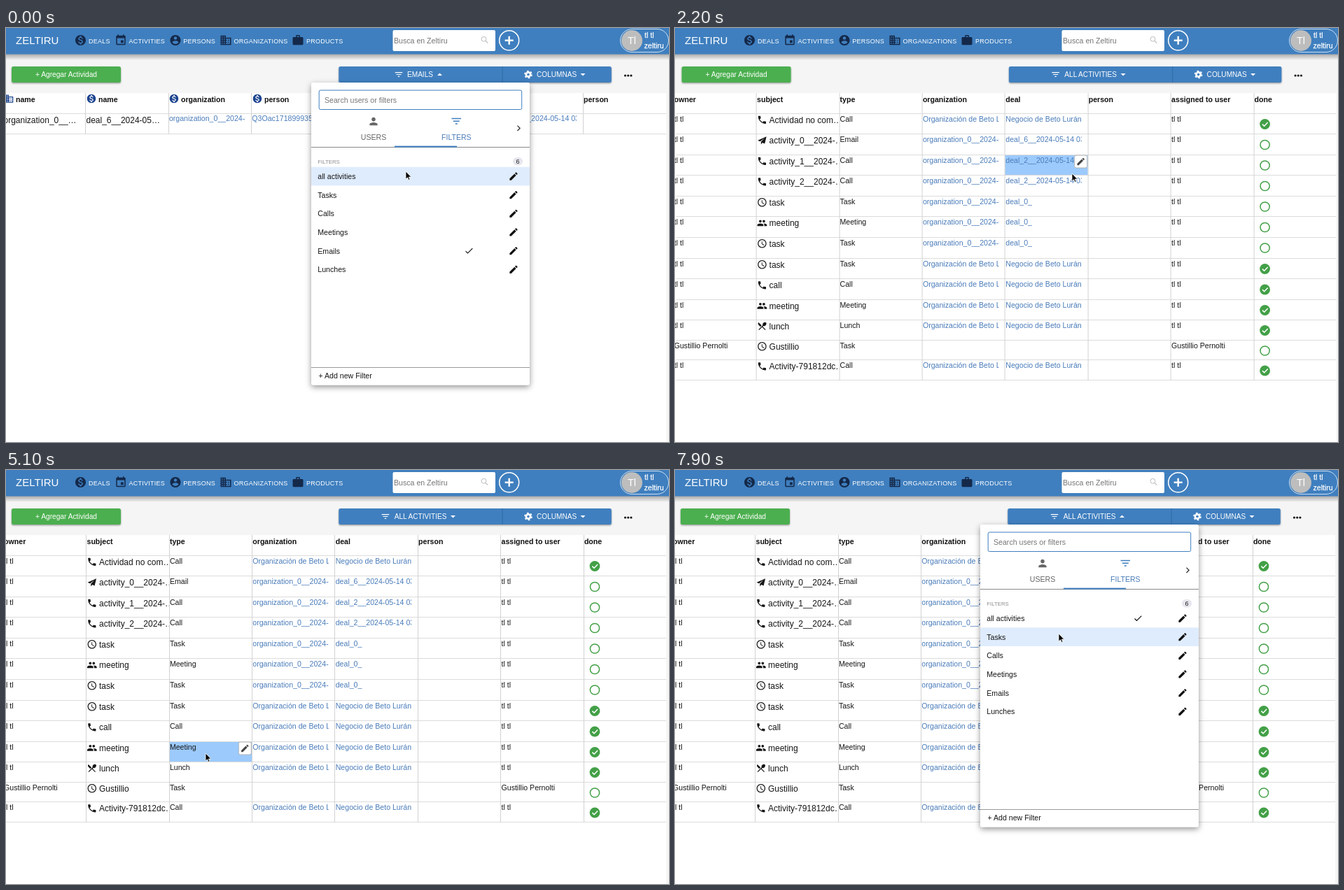
Animation of 947x592 px, one loop 8000 ms. Source, as an HTML page:

```html
<!DOCTYPE html>
<html lang="es">
<head>
<meta charset="utf-8">
<title>Activities</title>
<style>
html, body { margin: 0; width: 100%; height: 100%; overflow: hidden; background: #fff; }
#stage { display: block; width: 947px; height: 592px; font-family: "Liberation Sans", Arial, sans-serif; }
text { white-space: pre; }
</style>
</head>
<body>
<svg id="stage" viewBox="0 0 947 592"></svg>
<script>
const LOOP = 8000, STEP = 100;
const BLUE = '#3f7fbf', LINK = '#4a7cba', NAVY = '#14294a', INK = '#161616';
const COL_W = 118.4, ROWS = [122, 151.5, 181, 210.5, 240, 269.5, 299, 329, 358.5, 388, 417, 446, 474.5, 503.5];
const colX = i => -3.9 + COL_W * i;

const DISC = 'M12 2C6.48 2 2 6.48 2 12s4.48 10 10 10 10-4.48 10-10S17.52 2 12 2z';
const ICONS = {
  money: DISC + 'm1.41 16.09V20h-2.67v-1.93c-1.71-.36-3.16-1.46-3.27-3.4h1.96c.1 1.05.82 1.87 2.65 1.87 1.96 0 2.4-.98 2.4-1.59 0-.83-.44-1.61-2.67-2.14-2.48-.6-4.18-1.62-4.18-3.67 0-1.72 1.39-2.84 3.11-3.21V4h2.67v1.95c1.86.45 2.79 1.86 2.85 3.39H14.3c-.05-1.11-.64-1.87-2.22-1.87-1.5 0-2.4.68-2.4 1.64 0 .84.65 1.39 2.67 1.91s4.18 1.39 4.18 3.91c-.01 1.83-1.38 2.83-3.12 3.16z',
  event: 'M17 12h-5v5h5zM16 1v2H8V1H6v2H5c-1.1 0-2 .9-2 2v14c0 1.1.9 2 2 2h14c1.1 0 2-.9 2-2V5c0-1.1-.9-2-2-2h-1V1zm3 18H5V8h14z',
  account: DISC + 'm0 3c1.66 0 3 1.34 3 3s-1.34 3-3 3-3-1.34-3-3 1.34-3 3-3zm0 14.2c-2.5 0-4.71-1.28-6-3.22.03-1.99 4-3.08 6-3.08 1.99 0 5.97 1.09 6 3.08-1.29 1.94-3.5 3.22-6 3.22z',
  business: 'M12 7V3H2v18h20V7zM6 19H4v-2h2zm0-4H4v-2h2zm0-4H4V9h2zm0-4H4V5h2zm4 12H8v-2h2zm0-4H8v-2h2zm0-4H8V9h2zm0-4H8V5h2zm10 12h-8v-2h2v-2h-2v-2h2v-2h-2V9h8zm-2-8h-2v2h2zm0 4h-2v2h2z',
  work: 'M20 6h-4V4c0-1.1-.9-2-2-2h-4c-1.1 0-2 .9-2 2v2H4c-1.1 0-2 .9-2 2v11c0 1.1.9 2 2 2h16c1.1 0 2-.9 2-2V8c0-1.1-.9-2-2-2zm-6 0h-4V4h4z',
  call: 'M6.62 10.79c1.44 2.83 3.76 5.14 6.59 6.59l2.2-2.2c.27-.27.67-.36 1.02-.24 1.12.37 2.33.57 3.57.57.55 0 1 .45 1 1V20c0 .55-.45 1-1 1-9.39 0-17-7.61-17-17 0-.55.45-1 1-1h3.5c.55 0 1 .45 1 1 0 1.25.2 2.45.57 3.57.11.35.03.74-.25 1.02z',
  meeting: 'M16 11c1.66 0 3-1.34 3-3s-1.34-3-3-3-3 1.34-3 3 1.34 3 3 3zm-8 0c1.66 0 3-1.34 3-3S9.66 5 8 5 5 6.34 5 8s1.34 3 3 3zm0 2c-2.33 0-7 1.17-7 3.5V19h14v-2.5c0-2.33-4.67-3.5-7-3.5zm8 0l-1 .05c1.16.84 2 1.97 2 3.45V19h6v-2.5c0-2.33-4.67-3.5-7-3.5z',
  task: DISC + 'm0 18c-4.42 0-8-3.58-8-8s3.58-8 8-8 8 3.58 8 8-3.58 8-8 8zm.5-13H11v6l5.25 3.15.75-1.23-4.5-2.67z',
  lunch: 'M8.1 13.34l2.83-2.83L3.91 3.5c-1.56 1.56-1.56 4.09 0 5.66zm6.78-1.81c1.53.71 3.68.21 5.27-1.38 1.91-1.91 2.28-4.65.81-6.12-1.46-1.46-4.2-1.1-6.12.81-1.59 1.59-2.09 3.74-1.38 5.27L3.7 19.87l1.41 1.41L12 14.41l6.88 6.88 1.41-1.41L13.41 13z',
  email: 'M22 3L2 12l5.5 2.2L18 6.5 9.5 15v6l3.2-4 5.3 2.5z',
  edit: 'M3 17.25V21h3.75L17.81 9.94l-3.75-3.75zM20.71 7.04c.39-.39.39-1.02 0-1.41l-2.34-2.34c-.39-.39-1.02-.39-1.41 0l-1.83 1.83 3.75 3.75z',
  person: 'M12 12c2.21 0 4-1.79 4-4s-1.79-4-4-4-4 1.79-4 4 1.79 4 4 4zm0 2c-2.67 0-8 1.34-8 4v2h16v-2c0-2.66-5.33-4-8-4z',
  filter: 'M10 18h4v-2h-4zM3 6v2h18V6zm3 7h12v-2H6z',
  check: 'M9 16.17L4.83 12l-1.42 1.41L9 19 21 7l-1.41-1.41z',
  down: 'M6 9.5h12l-6 6z',
  up: 'M6 14.5h12l-6-6z'
};

const text = (x, y, s, size = 10.6, fill = INK, extra = '') =>
  `<text x="${x}" y="${y}" font-size="${size}" fill="${fill}" ${extra}>${s}</text>`;
const bold = (x, y, s) => text(x, y, s, 10.6, '#111', 'font-weight="bold"');
const rect = (x, y, w, h, fill, extra = '') =>
  `<rect x="${x}" y="${y}" width="${w}" height="${h}" fill="${fill}" ${extra}/>`;
const circle = (x, y, r, fill, extra = '') => `<circle cx="${x}" cy="${y}" r="${r}" fill="${fill}" ${extra}/>`;
const path = (d, stroke, w) => `<path d="${d}" fill="none" stroke="${stroke}" stroke-width="${w}"/>`;
const icon = (name, x, y, size, fill = INK) =>
  `<path transform="translate(${x - size / 2} ${y - size / 2}) scale(${size / 24})" d="${ICONS[name]}" fill="${fill}"/>`;
const clip = (x, y, w, inner) => `<svg x="${x}" y="${y}" width="${w}" height="29">${inner}</svg>`;
const group = (id, inner, extra = '') => `<g id="${id}" ${extra}>${inner}</g>`;
const CENTER = 'text-anchor="middle"';

function nav() {
  const links = [['money', 106.5, 118, 'DEALS'], ['event', 164, 175.5, 'ACTIVITIES'], ['account', 242, 253.2, 'PERSONS'],
    ['business', 314, 325.5, 'ORGANIZATIONS'], ['work', 417, 429, 'PRODUCTS']];
  return rect(0, 37, 947, 9, 'url(#navShadow)') + rect(0, 0, 947, 37.5, BLUE) +
    text(14, 23, 'ZELTIRU', 15, '#fff') +
    links.map(([name, ix, tx, label]) =>
      icon(name, ix, 17.5, 18, NAVY) + text(tx, 21.8, label, 9, '#fff', 'letter-spacing=".25"')).join('') +
    rect(552.5, 3, 146.5, 30, '#fff', 'rx="2"') + text(554, 21.7, 'Busca en Zeltiru', 10.6, '#757575') +
    circle(682.5, 15.8, 3.4, 'none', 'stroke="#bbb"') + path('M685 18.3l3.4 3.4', '#bbb', 1.2) +
    circle(718.7, 17.8, 14, 'none', 'stroke="#fff" stroke-width="1.5"') + path('M712.7 17.8h12M718.7 11.8v12', '#fff', 2.4) +
    rect(877.5, 1.5, 69, 33, 'none', 'rx="16.5" stroke="#cfe0f0"') + circle(894, 18, 15, '#bdbdbd') +
    text(894, 23, 'Tl', 14.5, '#fff', CENTER) +
    text(912, 14, 'tl tl', 10.6, '#fff', 'stroke="#fff" stroke-width=".25"') + text(911.5, 29, 'zeltiru', 10.6, '#fff', 'stroke="#fff" stroke-width=".25"');
}

function toolbar() {
  const label = (id, s, ix, tx, ax) => group(id, icon('filter', ix, 66.5, 14, '#fff') + text(tx, 70, s, 10.1, '#fff') +
    group(id + 'Down', icon('down', ax, 66.5, 14, '#fff')) + group(id + 'Up', icon('up', ax, 66.5, 14, '#fff')));
  return rect(8, 55, 156, 23, '#4caf50', 'rx="2.5" filter="url(#lift)"') +
    text(86, 69.7, '+ Agregar Actividad', 10.2, '#fff', CENTER) +
    rect(475.3, 55, 389.5, 23, BLUE, 'rx="2.5" filter="url(#lift)"') + rect(708.6, 55, 1, 23, '#2f6aa6') +
    label('emails', 'EMAILS', 561, 573, 619.5) + label('all', 'ALL ACTIVITIES', 542, 554.7, 638.5) +
    circle(746, 66.5, 3.1, 'none', 'stroke="#fff" stroke-width="2.6"') +
    circle(746, 66.5, 5, 'none', 'stroke="#fff" stroke-width="1.7" stroke-dasharray="2.6 2.636"') +
    text(758, 70, 'COLUMNAS', 10.1, '#fff') + icon('down', 824, 66.5, 14, '#fff') +
    [884.5, 888.7, 892.9].map(x => circle(x, 68, 1.6, '#111')).join('');
}

function grid(rowCount, dx = 0) {
  const bottom = ROWS[rowCount];
  let d = '';
  for (let i = 0; i <= rowCount; i++) d += `M0 ${Math.floor(ROWS[i]) + .5}H943`;
  let v = '';
  for (let i = 1; i < 8; i++) v += `M${Math.round(colX(i) + dx - .3) + .5} 93V${bottom}`;
  return path(d, '#dcdcdc', 1) + path(v, '#d2d2d2', 1);
}

function emailTable() {
  const heads = [['business', 4, 'name'], ['money', 122, 'name'], ['money', 240, 'organization'], ['money', 359, 'person']];
  const links = [[2, 'organization_0__2024-05'], [3, 'Q3Oac17189993511'], [6, 'deal_6__2024-05-14 03:']];
  return grid(1, -1) +
    heads.map(([name, x, s]) => icon(name, x, 101, 15, '#1b438f') + bold(x + 10, 106, s)).join('') + bold(825, 106, 'person') +
    text(-3.5, 135.5, 'organization_0__…', 12) + text(114.5, 135.5, 'deal_6__2024-05…', 12) +
    links.map(([c, s]) => clip(colX(c), 122, 108.5, text(0, 11.3, s, 10.6, LINK))).join('');
}

const ORG = 'Organización de Beto Lurán', DEAL = 'Negocio de Beto Lurán', ORG0 = 'organization_0__2024-05', USER = 'tl tl';
const LONG_NAME = 'Gustillio Pernolti';
// [subject, type, organization, deal, done, user]
const DATA = [
  ['Actividad no com…', 'Call', ORG, DEAL, 1],
  ['activity_0__2024-…', 'Email', ORG0, 'deal_6__2024-05-14 03:', 0],
  ['activity_1__2024-…', 'Call', ORG0, 'deal_2__2024-05-14 03:', 0],
  ['activity_2__2024-…', 'Call', ORG0, 'deal_2__2024-05-14 03:', 0],
  ['task', 'Task', ORG0, 'deal_0_', 0],
  ['meeting', 'Meeting', ORG0, 'deal_0_', 0],
  ['task', 'Task', ORG0, 'deal_0_', 0],
  ['task', 'Task', ORG, DEAL, 1],
  ['call', 'Call', ORG, DEAL, 1],
  ['meeting', 'Meeting', ORG, DEAL, 1],
  ['lunch', 'Lunch', ORG, DEAL, 1],
  ['Gustillio', 'Task', '', '', 0, LONG_NAME],
  ['Activity-791812dc…', 'Call', ORG, DEAL, 1]
];
const HEADS = ['owner', 'subject', 'type', 'organization', 'deal', 'person', 'assigned to user', 'done'];

function dataRow([subject, type, org, deal, done, user = USER], i) {
  const y = ROWS[i];
  const plain = (c, s, fill) => clip(colX(c) + 1, y, 108.5, text(0, 11.5, s, 10.6, fill));
  const mark = done
    ? circle(841, y + 15.5, 7.4, '#43a047') + path(`M837.4 ${y + 15.6}l2.7 2.7 5-5.2`, '#fff', 1.5)
    : circle(841, y + 15.5, 6.6, 'none', 'stroke="#43a047" stroke-width="1.5"');
  return group('row' + i, plain(0, user) + icon(type.toLowerCase(), 122.8, y + 9.3, 15) +
    clip(133, y, 99.5, text(0, 13.5, subject, 12, INK, `id="subject${i}"`)) +
    plain(2, type) + plain(3, org, LINK) + plain(4, deal, LINK) + plain(6, user) + mark);
}

const ITEMS = ['all activities', 'Tasks', 'Calls', 'Meetings', 'Emails', 'Lunches'];
const ITEM_TOP = 198.7, ITEM_H = 26.65;

function menu() {
  const itemY = i => ITEM_TOP + ITEM_H * (i + .5);
  return rect(436, 78, 312, 432.5, '#fff', 'rx="3" filter="url(#float)"') +
    rect(447.2, 89, 289.5, 27.5, '#fff', `rx="2" stroke="${BLUE}"`) +
    text(455, 106.7, 'Search users or filters', 10.6, '#777') +
    icon('person', 525, 133.5, 17, '#666') + text(525, 159.7, 'USERS', 10.6, '#666', CENTER) +
    icon('filter', 643.3, 133.3, 18, BLUE) + text(643.3, 159.7, 'FILTERS', 10.5, LINK, CENTER) +
    path('M730.5 139.6l3.6 3.7-3.6 3.7', '#333', 1.3) +
    rect(436, 170, 312, 1, '#8a8a8a') + rect(555, 168.6, 89, 2, BLUE) +
    text(445.3, 193.5, 'FILTERS', 7.8, '#8c8c8c') + rect(724, 185, 14, 11.5, '#e6e6ee', 'rx="5.7"') +
    text(731, 194, '6', 9, '#222', CENTER) +
    rect(436, 0, 312, ITEM_H, '#dfecfd', 'id="itemHover"') +
    ITEMS.map((s, i) => text(445.3, itemY(i) + 4, s) + icon('edit', 725, itemY(i), 15, '#111')).join('') +
    group('tick', icon('check', 661.3, ITEM_TOP + ITEM_H / 2, 14.5, '#111')) +
    rect(436, 485, 312, 1, '#9a9a9a') + text(446.5, 501, '+ Add new Filter');
}

const stage = document.getElementById('stage');
stage.innerHTML = `<defs>
  <linearGradient id="navShadow" x2="0" y2="1"><stop stop-color="#000" stop-opacity=".32"/><stop offset="1" stop-color="#000" stop-opacity="0"/></linearGradient>
  <filter id="lift" x="-5%" y="-20%" width="110%" height="160%"><feDropShadow dx="0" dy="1.2" stdDeviation="1.2" flood-opacity=".4"/></filter>
  <filter id="float" x="-10%" y="-10%" width="120%" height="120%"><feDropShadow dx="0" dy="3" stdDeviation="4" flood-opacity=".42"/></filter>
  </defs>` +
  rect(0, 0, 947, 592, '#f5f5f5') +
  group('page', rect(-4, 93, 947, 499, '#fff') +
    group('emailTable', emailTable()) +
    group('table', rect(0, 0, COL_W, 29, '#9ccafc', 'id="cell"') + grid(13) +
      HEADS.map((s, i) => group('head' + i, bold(colX(i) + 1, 106, s))).join('') + DATA.map(dataRow).join('') +
      group('pencil', rect(-9, -9, 18, 18, '#fff', 'rx="2.5" stroke="#b5b5b5"') + icon('edit', 0, 0, 14, '#444'))) +
    toolbar()) +
  nav() + group('menu', menu()) +
  group('tip', rect(470.5, 45, 94.5, 29, '#616161', 'rx="2.5"') + text(475, 54.5, 'deal_id', 7, '#fff') +
    text(475, 68.5, 'activity.deal_id.id=Deal.id', 6.8, '#fff')) +
  group('arrow', '<path d="M0 0V11.2L2.6 8.8 4.2 12.4 6 11.6 4.4 8.1H7.8Z" fill="#000" stroke="#fff" stroke-width=".8"/>') +
  group('hand', '<path d="M-1.2 .8Q0-.6 1.2.8V5L6 6Q7.2 6.3 7 7.8L6 13H-.5L-4.6 8.2Q-4.8 6.6-3 7L-1.2 8.4Z" fill="#fff" stroke="#111"/><path d="M1.2 8V5M3.2 8V5.6M5 8V6" stroke="#111" stroke-width=".7"/>');

const el = {};
stage.querySelectorAll('[id]').forEach(n => el[n.id] = n);
const show = (id, on) => el[id].setAttribute('visibility', on ? 'inherit' : 'hidden');
const move = (id, x, y) => el[id].setAttribute('transform', `translate(${x} ${y})`);

// Piecewise linear track of [time, ...values]
function track(keys, t) {
  let i = keys.findIndex(k => k[0] > t);
  if (i < 0) return keys[keys.length - 1].slice(1);
  const a = keys[Math.max(i - 1, 0)], b = keys[i], p = a === b ? 0 : (t - a[0]) / (b[0] - a[0]);
  return a.slice(1).map((v, k) => v + (b[k + 1] - v) * p);
}
const POINTER = [[0, 571, 205], [400, 567, 208], [3100, 567, 208], [3200, 470, 222], [3300, 240, 262], [3400, 162, 271],
  [4100, 162, 271], [4500, 205, 318], [4800, 268, 390], [5000, 284, 404], [5100, 285, 405], [5200, 285, 405],
  [5600, 370, 305], [6000, 515, 110], [6100, 515, 110], [6400, 535, 87], [6700, 545, 65], [7400, 545, 65],
  [7600, 547, 130], [7900, 548, 234]];
const MENU = [[0, 1], [900, 1], [1200, 0], [6900, 0], [7000, .6], [7100, .9], [7200, 1]];
const TIP = [[0, 0], [6100, 0], [6200, .85], [6300, .5], [6400, .22], [6500, 0]];

function draw(now) {
  const t = Math.floor(now / STEP) * STEP;
  const [x, y] = track(POINTER, t), [open] = track(MENU, t);
  const loaded = t >= 500, shift = t >= 2000 && t < 2400 ? 1.6 : 0;
  const menuUp = t < 1000 || t >= 6900;

  move('page', shift, 0);
  show('emailTable', !loaded);
  show('table', loaded);
  for (const [id, on] of [['emails', !loaded], ['all', loaded]]) {
    show(id, on);
    show(id + 'Up', on && menuUp);
    show(id + 'Down', on && !menuUp);
    if (!on) { show(id + 'Up', false); show(id + 'Down', false); }
  }
  const heads = t < 1500 ? 0 : t < 1600 ? 4 : t < 1700 ? 6 : 8;
  const rows = t < 1700 ? 0 : t < 1900 ? 1 : t < 2000 ? 6 : 13;
  HEADS.forEach((_, i) => show('head' + i, i < heads));
  DATA.forEach((_, i) => show('row' + i, i < rows));

  const col = Math.floor((x - shift - colX(0)) / COL_W);
  const row = ROWS.findIndex((top, i) => y >= top && y < ROWS[i + 1]);
  const hover = loaded && open === 0 && row >= 0;
  show('cell', hover);
  show('pencil', hover && rows > row);
  if (hover) {
    el.cell.setAttribute('height', ROWS[row + 1] - ROWS[row]);
    move('cell', colX(col), ROWS[row]);
    move('pencil', colX(col + 1) - 10, ROWS[row] + 10);
  }
  const onSubject = hover && col === 1 && x > 133 && x < 178 && y < ROWS[row] + 17;
  DATA.forEach((_, i) => el['subject' + i].setAttribute('text-decoration', onSubject && i === row ? 'underline' : 'none'));

  const s = .75 + .25 * Math.min(1, open + .2 * Math.sign(open));
  el.menu.setAttribute('opacity', open);
  el.menu.setAttribute('transform', `translate(592 78) scale(${s} ${s * s}) translate(-592 -78)`);
  show('menu', open > 0);
  const item = Math.floor((y - ITEM_TOP) / ITEM_H);
  show('itemHover', open > 0 && item >= 0 && item < ITEMS.length);
  el.itemHover.setAttribute('y', ITEM_TOP + ITEM_H * item);
  move('tick', 0, t < 300 ? ITEM_H * 4 : 0);

  el.tip.setAttribute('opacity', track(TIP, t)[0]);
  show('arrow', !onSubject);
  show('hand', onSubject);
  move('arrow', x, y);
  move('hand', x, y);
}

const start = performance.now();
function frame() {
  draw((performance.now() - start) % LOOP);
  requestAnimationFrame(frame);
}
frame();
</script>
</body>
</html>
```
